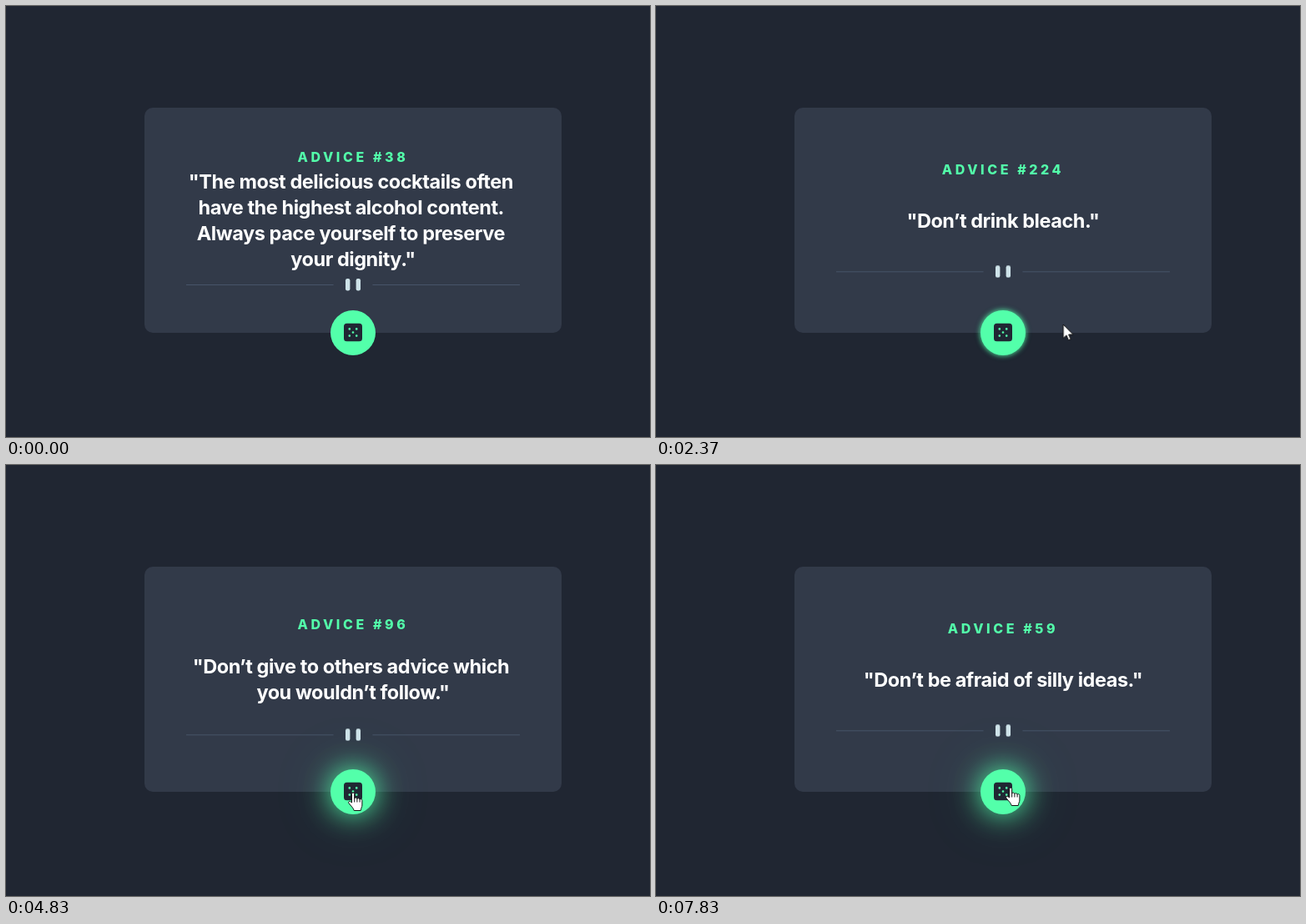
An HTML page that plays this animation: 772 by 517 pixels, repeating every 8 s.

```html
<!DOCTYPE html>
<html lang="en">
<head>
<meta charset="utf-8">
<title>Advice generator</title>
<style>
  :root { --green: #53ffaa; --dark: #202632; --loop: 8s linear infinite; }
  html, body { margin: 0; width: 100%; height: 100%; overflow: hidden; background: var(--dark); }
  body { position: relative; }
  .card, .dice, svg { position: absolute; }
  .card { left: 166px; top: 122px; width: 500px; height: 270px; border-radius: 10px; background: #323a49; }
  .dice {
    left: 389px; top: 365px; width: 54px; height: 54px; border-radius: 50%;
    background: var(--green); animation: glow var(--loop);
  }
  svg { left: 0; top: 0; width: 772px; height: 517px; }
  text { font-family: Inter, "Open Sans", sans-serif; font-optical-sizing: none; text-anchor: middle; }
  .title { font-size: 16px; font-weight: 800; letter-spacing: 3.6px; fill: var(--green); }
  .quote { font-size: 23.5px; font-weight: 700; letter-spacing: -.45px; fill: #fff; }

  .advice { opacity: 0; animation: 8s step-end infinite; }
  .a1 { animation-name: first; }
  .a2 { animation-name: second; }
  .a3 { animation-name: third; }
  .a4 { animation-name: fourth; }
  @keyframes first  { 0% { opacity: 1 } 25.1%, 100% { opacity: 0 } }
  @keyframes second { 0% { opacity: 0 } 25.1% { opacity: 1 } 60.35%, 100% { opacity: 0 } }
  @keyframes third  { 0% { opacity: 0 } 60.35% { opacity: 1 } 97.85%, 100% { opacity: 0 } }
  @keyframes fourth { 0% { opacity: 0 } 97.85%, 100% { opacity: 1 } }

  @keyframes glow {
    0%, 10.5%, 31.5%, 43.125%, 72.375%, 84% {
      box-shadow: 0 0 0 var(--green), 0 0 0 rgba(83, 255, 170, 0);
      animation-timing-function: ease;
    }
    13.5%, 27.75%, 46.125%, 68.625%, 87.375%, 100% {
      box-shadow: 0 0 34px var(--green), 0 0 80px rgba(83, 255, 170, .2);
      animation-timing-function: ease;
    }
  }

  .pointer { animation: move var(--loop); }
  @keyframes move {
    0%, 3.375% { transform: translate(785px, 78px); animation-timing-function: cubic-bezier(.3, .2, .6, .9); }
    10.5%      { transform: translate(437px, 374px); animation-timing-function: ease-out; }
    13.5%      { transform: translate(407px, 389px); }
    24.375%    { transform: translate(407px, 389px); animation-timing-function: ease-in; }
    29.625%    { transform: translate(488px, 382px); animation-timing-function: ease-out; }
    32.25%     { transform: translate(515px, 388px); }
    40%        { transform: translate(515px, 388px); animation-timing-function: ease-in-out; }
    46.125%    { transform: translate(416px, 393px); }
    64.6%      { transform: translate(416px, 393px); animation-timing-function: ease-in; }
    68.25%     { transform: translate(444px, 387px); animation-timing-function: ease-out; }
    73.125%    { transform: translate(526px, 395px); }
    79%        { transform: translate(526px, 395px); animation-timing-function: ease-in; }
    81.375%    { transform: translate(492px, 392px); animation-timing-function: ease-out; }
    87.375%, 100% { transform: translate(425px, 387px); }
  }
  .arrow { animation: arrow 8s step-end infinite; }
  .hand { animation: hand 8s step-end infinite; }
  @keyframes arrow {
    0%, 27.75%, 68.625% { opacity: 1 }
    10.5%, 43.125%, 84%, 100% { opacity: 0 }
  }
  @keyframes hand {
    0%, 27.75%, 68.625% { opacity: 0 }
    10.5%, 43.125%, 84%, 100% { opacity: 1 }
  }
</style>
</head>
<body>
<div class="card"></div>
<div class="dice"></div>
<svg viewBox="0 0 772 517">
  <defs>
    <g id="divider">
      <path fill="#4f5d74" d="M0 8h196v1H0zM248 8h196v1H248z"/>
      <g fill="#cee3e9">
        <rect x="212" width="6" height="16" rx="2.5"/>
        <rect x="226" width="6" height="16" rx="2.5"/>
      </g>
    </g>
  </defs>

  <g class="advice a1">
    <text class="title" x="416" y="187">ADVICE #38</text>
    <text class="quote">
      <tspan x="416" y="219">"The most delicious cocktails often</tspan>
      <tspan x="416" y="250">have the highest alcohol content.</tspan>
      <tspan x="416" y="281">Always pace yourself to preserve</tspan>
      <tspan x="416" y="312">your dignity."</tspan>
    </text>
    <use href="#divider" transform="translate(216 327) scale(.9009)"/>
  </g>
  <g class="advice a2">
    <text class="title" x="416" y="202">ADVICE #224</text>
    <text class="quote" x="416" y="266">"Don’t drink bleach."</text>
    <use href="#divider" transform="translate(216 311.3) scale(.9009)"/>
  </g>
  <g class="advice a3">
    <text class="title" x="416" y="197">ADVICE #96</text>
    <text class="quote">
      <tspan x="416" y="250">"Don’t give to others advice which</tspan>
      <tspan x="416" y="281">you wouldn’t follow."</tspan>
    </text>
    <use href="#divider" transform="translate(216 316.3) scale(.9009)"/>
  </g>
  <g class="advice a4">
    <text class="title" x="416" y="202">ADVICE #59</text>
    <text class="quote" x="416" y="266">"Don’t be afraid of silly ideas."</text>
    <use href="#divider" transform="translate(216 311.3) scale(.9009)"/>
  </g>

  <g transform="translate(416 391.5)">
    <rect x="-11" y="-10.8" width="22" height="21.6" rx="3.6" fill="#202733"/>
    <path d="M0 0h0M-4.2-4.1h0M4.2-4.1h0M-4.2 4.1h0M4.2 4.1h0"
          stroke="#53ffaa" stroke-width="2.7" stroke-linecap="round"/>
  </g>

  <g class="pointer" fill="#fff" stroke="#111" stroke-linejoin="round">
    <path class="arrow" d="M0 0v16.5l3.8-3.6 2.5 5.8 2.6-1.1-2.4-5.6h5.2z"/>
    <g class="hand">
      <path d="M-1.5 12V1.6a1.6 1.6 0 0 1 3.2 0V7.5c0-2 3-2 3.2.3.3-1.6 3-1.5 3.2.6.3-1.3 2.8-1 2.8 1.2V15c0 2-1.3 3.5-1.7 6.5H1.2C.6 18.5-2.5 16-5 12.8-6.3 10.8-4 9.3-1.5 12z"/>
      <path fill="none" d="M1.7 7.5v4M4.9 8v3.5M8.1 8.5v3"/>
    </g>
  </g>
</svg>
</body>
</html>
```
